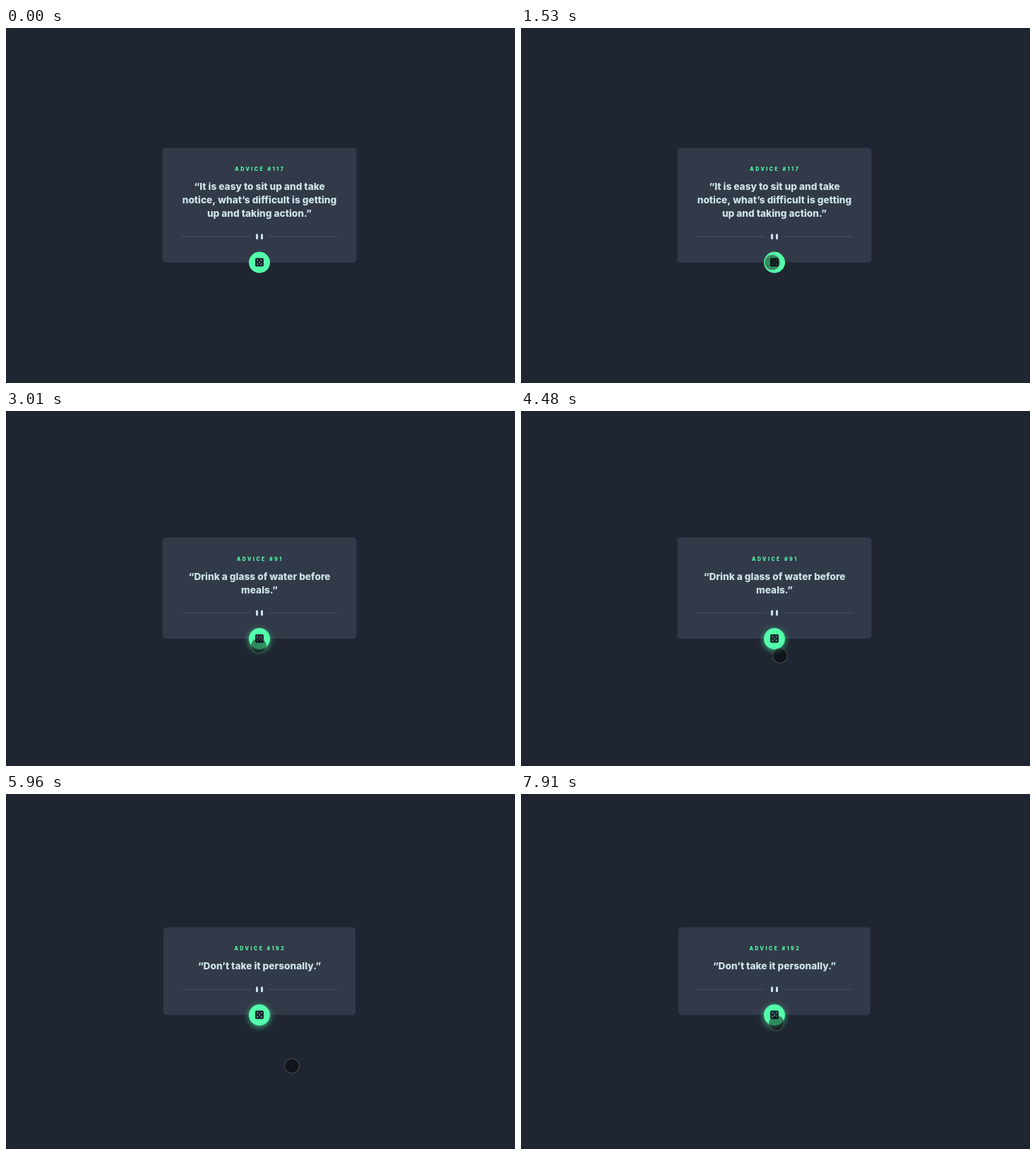
Recreate the animation shown at these times as an HTML page with a canvas. Size 721 by 502 pixels, loop 8000 ms.

```html
<!DOCTYPE html>
<html lang="en">
<head>
<meta charset="utf-8">
<title>Advice generator</title>
<style>
html, body { margin: 0; width: 100%; height: 100%; overflow: hidden; background: #1f2632; }
canvas { display: block; }
</style>
</head>
<body>
<canvas id="stage" width="721" height="502"></canvas>
<script>
const ctx = document.getElementById('stage').getContext('2d');
const LOOP = 8000, CX = 359;
const GREEN = '#53ffaa', NAVY = '#1f2632', CARD = '#323a49', PALE = '#cee3e9';

const cards = [
  { at: 0, id: 117, left: 221.5, top: 169.5, bottom: 331.5, rule: 295,
    lines: ['“It is easy to sit up and take', 'notice, what’s difficult is getting', 'up and taking action.”'] },
  { at: 3010, id: 91, left: 221.5, top: 179, bottom: 322, rule: 285.5,
    lines: ['“Drink a glass of water before', 'meals.”'] },
  { at: 5800, id: 192, left: 223, top: 188.5, bottom: 312.5, rule: 276.2,
    lines: ['“Don’t take it personally.”'] }
];

// Pointer moves: path is 2, 3 or 4 Bezier points
const linear = s => s;
const easeOut = s => 1 - (1 - s) * (1 - s);
const moves = [
  { start: 650, end: 1450, steps: 10, path: [[578, 478], [430, 440], [220, 300], [356, 331.5]] },
  { start: 1920, end: 2000, steps: 1, path: [[356, 331.5], [357, 332.5]] },
  { start: 2160, end: 2240, steps: 1, path: [[357, 332.5], [358, 332]] },
  { start: 4400, end: 4560, steps: 2, path: [[358, 332], [376, 360]] },
  { start: 4954, end: 5410, steps: 6, ease: easeOut, path: [[376, 360], [364, 331.5]] },
  { start: 5720, end: 5960, steps: 3, path: [[364, 331.5], [405, 384.5]] },
  { start: 6811, end: 7680, steps: 11, path: [[405, 384.5], [390, 388], [368, 341.5]] },
  { start: 7670, end: 7910, steps: 3, path: [[368, 341.5], [362, 324]] }
];

function bezier(points, s) {
  while (points.length > 1) {
    points = points.slice(1).map((p, i) => p.map((v, k) => points[i][k] + (v - points[i][k]) * s));
  }
  return points[0];
}

function pointerAt(t) {
  const move = moves.filter(m => t >= m.start).pop();
  if (!move) return null;
  const { start, end, steps, path, ease = linear } = move;
  const step = Math.floor((t - start + 6) / (end - start) * steps);
  return bezier(path, ease(Math.min(1, step / steps)));
}

function glowAt(t) {
  if (t < 2240) return 0;
  if (t < 2320) return 0.35;
  return t >= 5570 && t < 5650 ? 0.8 : 0.65;
}

function disc(x, y, r, fill) {
  ctx.fillStyle = fill;
  ctx.beginPath();
  ctx.arc(x, y, r, 0, Math.PI * 2);
  ctx.fill();
}

function box(x, y, w, h, r, fill) {
  ctx.fillStyle = fill;
  ctx.beginPath();
  ctx.roundRect(x, y, w, h, r);
  ctx.fill();
}

function drawText(text, x, y, font, color, spacing = '0px') {
  ctx.font = font;
  ctx.letterSpacing = spacing;
  ctx.fillStyle = color;
  ctx.fillText(text, x, Math.round(y));
}

function drawCard(card) {
  box(card.left, card.top, (CX - card.left) * 2, card.bottom - card.top, 4.8, CARD);
  drawText('ADVICE #' + card.id, CX + 0.8, card.top + 32.6, '800 7px Inter, sans-serif', GREEN, '2.5px');
  card.lines.forEach((line, i) =>
    drawText(line, CX, card.top + 59.6 + i * 19, '800 13.7px Inter, sans-serif', PALE));

  ctx.fillStyle = '#4f5d74';
  for (const x of [248, 372]) ctx.fillRect(x, card.rule - 0.3, 98, 0.6);
  for (const x of [354, 361]) box(x, card.rule - 4, 3, 8, 1.5, PALE);
}

function drawButton(y, glow) {
  ctx.save();
  ctx.shadowColor = `rgba(83, 255, 170, ${glow})`;
  ctx.shadowBlur = 8;
  ctx.shadowOffsetY = 2;
  disc(CX, y, 15, GREEN);
  ctx.restore();
  box(CX - 6, y - 6.3, 12, 12, 1.8, NAVY);
  for (const [dx, dy] of [[0, 0], [-1, -1], [1, -1], [-1, 1], [1, 1]]) {
    disc(CX + dx * 2.7, y - 0.3 + dy * 2.7, 0.8, GREEN);
  }
}

function drawPointer([x, y]) {
  disc(x, y, 10.2, 'rgba(0, 0, 0, 0.45)');
  ctx.strokeStyle = 'rgba(90, 90, 90, 0.55)';
  ctx.lineWidth = 1.4;
  ctx.beginPath();
  ctx.arc(x, y, 10.4, 0, Math.PI * 2);
  ctx.stroke();
}

function draw(t) {
  ctx.fillStyle = NAVY;
  ctx.fillRect(0, 0, 721, 502);
  ctx.textAlign = 'center';
  const card = cards.filter(c => t >= c.at).pop();
  drawCard(card);
  drawButton(card.bottom, glowAt(t));
  const pointer = pointerAt(t);
  if (pointer) drawPointer(pointer);
}

const began = performance.now();
function tick() {
  draw((performance.now() - began) % LOOP);
  requestAnimationFrame(tick);
}
tick();
</script>
</body>
</html>
```
